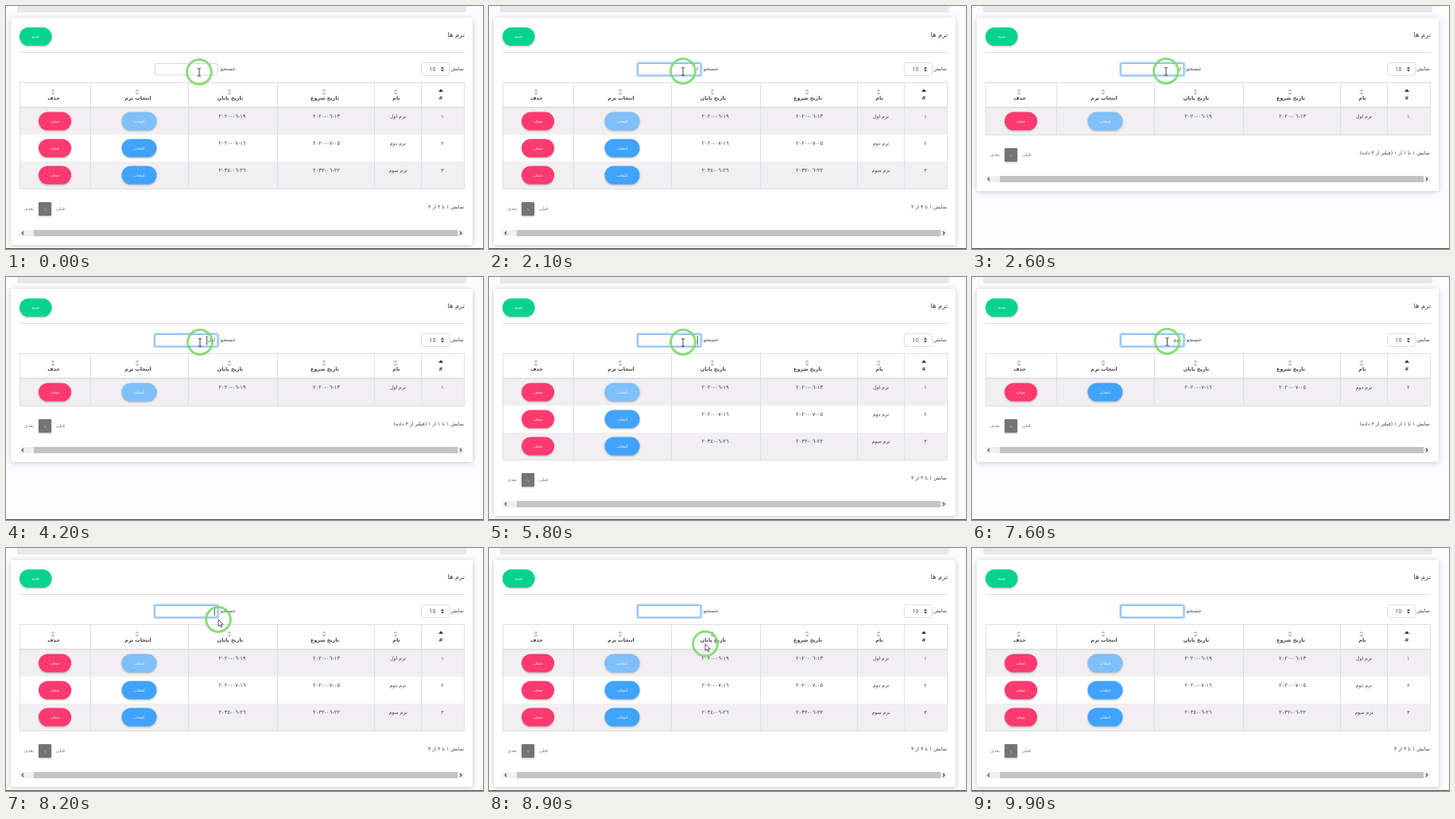
An HTML page that plays this animation: 600x306 px, repeating every 10000 ms.

```html
<!DOCTYPE html>
<html lang="fa">
<head>
<meta charset="utf-8">
<title>ترم ها</title>
<style>
  html, body { margin: 0; width: 100%; height: 100%; overflow: hidden; background: #fcfbfd; }
  svg { display: block; width: 600px; height: 306px; }
  text { font: 6.2px "DejaVu Sans", sans-serif; fill: #3d4045; direction: rtl; text-anchor: middle; }
  .start { text-anchor: start; }
  .head { font-size: 6.3px; font-weight: bold; }
  .date { font-size: 6.8px; direction: ltr; unicode-bidi: bidi-override; }
  .btn { font-size: 5.1px; fill: #fff; }
  .nav { font-size: 5.8px; fill: #77797d; }
  .latin { font: 7px "Open Sans", sans-serif; direction: ltr; }
  .pill, .page { filter: drop-shadow(0 1.3px 1.3px rgba(0, 0, 0, .28)); }
  .card { fill: #fff; filter: drop-shadow(0 1px 3px rgba(60, 60, 80, .28)); }
  .line { stroke: #dcdfe3; fill: none; }
  #glow { fill: none; stroke: #b4d6fb; stroke-width: 2.4; }
  #box { fill: #fff; stroke: #d3d7dc; }
  .focus #box { stroke: #7db7f5; }
  svg:not(.focus) #glow { display: none; }
</style>
</head>
<body>
<svg id="stage" viewBox="0 0 600 306">
  <rect width="600" height="306" fill="#fcfbfd"/>
  <path d="M14 0H579V6q0 2-2 2H16q-2 0-2-2z" fill="#e6e8ee"/>
  <rect id="card" class="card" x="6" y="15" width="581" height="286" rx="3"/>
  <g id="top"></g>
  <g id="rows"></g>
  <g id="foot"></g>
  <rect id="glow" x="186.5" y="71.5" width="80.5" height="16.5" rx="2"/>
  <rect id="box" x="187.5" y="72.5" width="78.5" height="14.5" rx="1.5"/>
  <text id="query" class="start" x="263" y="81"></text>
  <path id="caret" d="M0 74V85.5" stroke="#333" stroke-width=".9"/>
  <path d="M0 305.5H600" stroke="#4b4b4d"/>
  <g id="pointer">
    <circle r="15.4" fill="none" stroke="#79da68" stroke-opacity=".88" stroke-width="3"/>
    <path id="beam" d="M-2-4.5Q0-4.5 0-3.5Q0-4.5 2-4.5M0-4V5M-2 5.5Q0 5.5 0 4.5Q0 5.5 2 5.5" fill="none" stroke="#333" stroke-width=".9"/>
    <path id="arrow" d="M0 0V8.6L2 6.8 3.4 9.8 4.8 9.2 3.4 6.3H6.2Z" fill="#fff" stroke="#333" stroke-width=".8"/>
  </g>
</svg>
<script>
const LOOP = 10000, STEP = 100, ROW = 34, TOP = 128;
const EDGES = [17, 106, 229, 341, 463, 522, 576];
const HEADS = [[60, 'حذف'], [166, 'انتخاب ترم'], [282, 'تاریخ پایان'], [401, 'تاریخ شروع'], [491, 'نام'], [547, '#']];
const TERMS = [
  ['١', 'ترم اول', '٢٠٢٠-٠٦-١٣', '٢٠٢٠-٠٦-١٩'],
  ['٢', 'ترم دوم', '٢٠٢٠-٠٧-٠٥', '٢٠٢٠-٠٧-١٦'],
  ['٣', 'ترم سوم', '٢٠٣٢-٠٦-٢٢', '٢٠٣٤-٠٦-٢٦']
];

// [time, value]: each value holds until the next entry
const TYPED = [[0, ''], [2000, 'ا'], [2600, 'او'], [4000, 'اول'], [4900, 'او'], [5100, 'ا'], [5200, ''],
  [6300, 'د'], [6700, 'دو'], [6900, 'دوم'], [7700, 'دو'], [7800, 'د'], [7900, '']];
const SHOWN = [[0, [0, 1, 2]], [2400, [0]], [5400, [0, 1, 2]], [6400, [1]], [8100, [0, 1, 2]]];
const FOCUS = 500, BLINK = 530, LAST_CARET = 8500;
// [time, x, y]
const PATH = [[0, 243, 83], [100, 243, 83], [1000, 244, 82], [7500, 244, 82], [7600, 245.5, 81],
  [8200, 267, 90], [8700, 268, 91], [9600, 300, 326], [LOOP, 300, 326]];

const $ = id => document.getElementById(id);
const text = (x, y, s, cls = '') => `<text x="${x}" y="${y}" class="${cls}">${s}</text>`;
const rect = (x, y, w, h, fill, more = '') => `<rect x="${x}" y="${y}" width="${w}" height="${h}" fill="${fill}" ${more}/>`;
const line = d => `<path class="line" d="${d}"/>`;
const shape = (d, fill) => `<path d="${d}" fill="${fill}"/>`;
const pill = (x, y, w, fill, label) =>
  rect(x, y, w, 23, fill, 'rx="11.5" class="pill"') + text(x + w / 2, y + 13.2, label, 'btn');

function drawTop() {
  let s = pill(17, 27, 40.5, '#06d48e', 'جدید');
  s += '<text class="start" x="577" y="39" style="font-size:8.3px">ترم ها</text>';
  s += line('M17 58.5H577');
  s += text(576, 81, 'نمایش', 'start') + text(288.5, 81, 'جستجو:', 'start');
  s += rect(522.5, 71.5, 35, 16, '#fff', 'rx="2" class="line"') + text(536.5, 82.3, '10', 'latin');
  s += shape('M547 79l2-2.6 2 2.6zM547 80.2l2 2.6 2-2.6z', '#3d4045');
  HEADS.forEach(([x, label], i) => {
    const c = i == 5 ? 547 : x - 1;
    s += i == 5 ? shape(`M${c - 3} 108l3-3.4 3 3.4z`, '#333')
      : shape(`M${c - 2.7} 107.6l2.7-3 2.7 3zM${c - 2.7} 109.2l2.7 3 2.7-3z`, '#bcbdc1');
    s += text(x, 117.5, label, 'head');
  });
  $('top').innerHTML = s;
}

function drawRow(k, i) {
  const [num, name, from, to] = TERMS[k], y = TOP + i * ROW;
  return rect(17, y, 559, ROW, i % 2 ? '#fff' : '#f1eff1') +
    text(549, y + 13, num) + text(493, y + 13, name) +
    text(403, y + 13, from, 'date') + text(284.5, y + 13, to, 'date') +
    pill(41, y + 5.5, 41, '#fd3a70', 'حذف') +
    pill(145.5, y + 5.5, 44, k ? '#40a3fd' : '#7fbffa', 'انتخاب') +
    line(`M17 ${y + ROW + .5}H576.5`);
}

function drawFoot() {
  let s = text(68.5, 257, 'قبلی', 'nav') + text(29, 257, 'بعدی', 'nav');
  s += rect(41, 247, 16, 17, '#757378', 'rx="1" class="page"') + text(49, 257.7, '١', 'btn');
  s += '<text id="info" class="start" x="576" y="254.5"></text>';
  s += rect(17, 282, 559, 8, '#f0f0f1') + rect(35, 282, 533, 8, '#c3c2c4');
  s += '<path d="M22 284l-2 2 2 2M571 284l2 2-2 2" fill="none" stroke="#444" stroke-width="1.1"/>';
  $('foot').innerHTML = s;
}

const at = (list, t) => list.filter(e => e[0] <= t).pop()[1];

function place(t) {
  const i = PATH.findIndex(p => p[0] > t), a = PATH[i - 1], b = PATH[i];
  const u = (t - a[0]) / (b[0] - a[0]), e = u * u * (3 - 2 * u);
  return [a[1] + (b[1] - a[1]) * e, a[2] + (b[2] - a[2]) * e];
}

let shown;
function showRows(list) {
  if (list === shown) return;
  shown = list;
  const n = list.length, bottom = TOP + n * ROW, lift = (n - 3) * ROW;
  $('rows').innerHTML = list.map(drawRow).join('') +
    line(EDGES.map(x => `M${x + .5} 96V${bottom}`).join('') + 'M17 96.5H576.5') +
    rect(17, 126.8, 560, 1.6, '#d9dce0');
  $('card').setAttribute('height', 286 + lift);
  $('foot').setAttribute('transform', `translate(0 ${lift})`);
  $('info').textContent = n == 3 ? 'نمایش ١ تا ٣ از ٣' : 'نمایش ١ تا ١ از ١ (فیلتر از ٣ داده)';
}

function render(t) {
  showRows(at(SHOWN, t));
  const typed = at(TYPED, t), query = $('query');
  $('stage').classList.toggle('focus', t >= FOCUS);
  if (query.textContent !== typed) query.textContent = typed;

  const lit = t >= FOCUS && t < LAST_CARET && Math.floor((t - FOCUS) / BLINK) % 2 == 0;
  const width = typed ? query.getComputedTextLength() + .4 : 0;
  $('caret').setAttribute('transform', `translate(${262.3 - width} 0)`);
  $('caret').style.display = lit ? '' : 'none';

  const [x, y] = place(t), inside = x > 187 && x < 266 && y > 72 && y < 88;
  $('pointer').setAttribute('transform', `translate(${x} ${y})`);
  $('beam').style.display = inside ? '' : 'none';
  $('arrow').style.display = inside ? 'none' : '';
}

drawTop();
drawFoot();
const start = performance.now();
function tick() {
  const t = (performance.now() - start) % LOOP;
  render(Math.floor(t / STEP) * STEP);
  requestAnimationFrame(tick);
}
tick();
</script>
</body>
</html>
```
